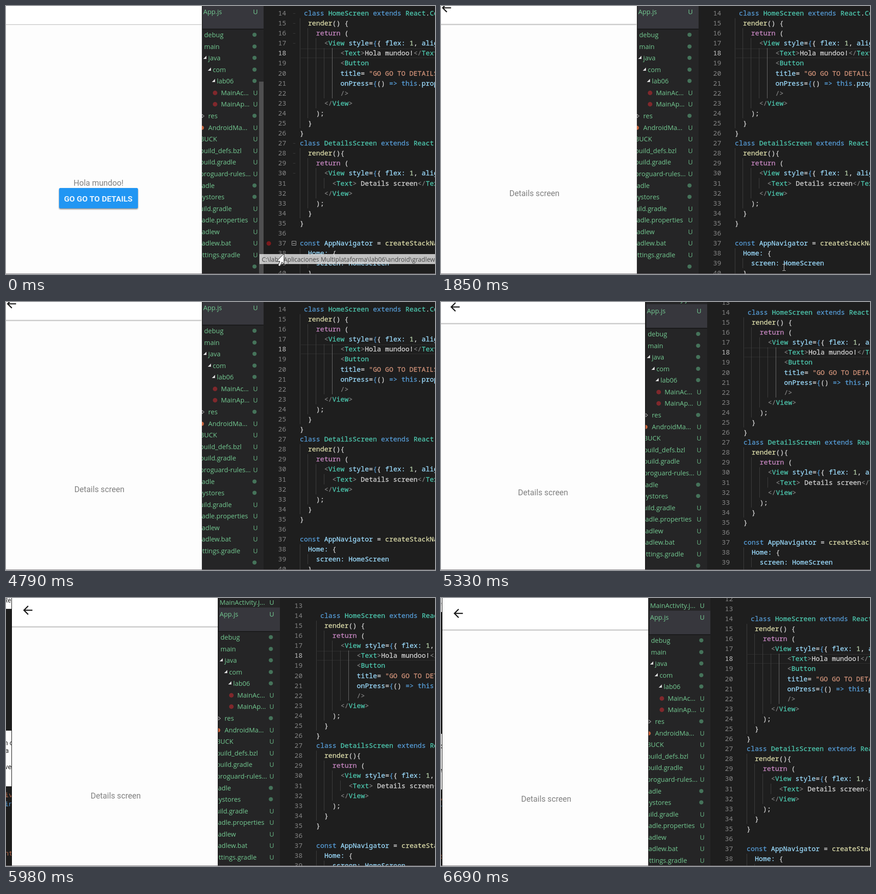
Animation of 946x592 px, one loop 8000 ms. Source, as an HTML page with a canvas:

```html
<!DOCTYPE html>
<html lang="en">
<head>
<meta charset="utf-8">
<title>App preview and editor</title>
<style>
  html, body { margin: 0; width: 100%; height: 100%; overflow: hidden; background: #1e1e1e; }
  canvas { display: block; width: 946px; height: 592px; }
</style>
</head>
<body>
<canvas id="stage" width="946" height="592"></canvas>
<script>
const ctx = document.getElementById('stage').getContext('2d', { alpha: false });
const W = 946, LOOP = 8000;
const MONO = '14.92px "Noto Sans Mono", monospace';
const UI = '14.45px "Open Sans", sans-serif';
const APP = '17.6px Roboto, sans-serif';
const CHAR = 8.952, LINE = 22.09, CODE_X = 648;

const COLORS = {
  b: '#569cd6', t: '#4ec9b0', w: '#d4d4d4', y: '#dcdcaa', p: '#c586c0',
  g: '#808080', a: '#9cdcfe', s: '#ce9178', n: '#b5cea8'
};

// line number: [column, tokens as colour|text joined by ~]
const VIEW = 'g|<~t|View~a| style~w|=~b|{~w|{ ~a|flex:~n| 1~w|, ~a|alignItems:~s| "center"';
const CODE = {
  14: [1, 'b|class ~t|HomeScreen ~b|extends ~t|React~w|.~t|Component ~w|{'],
  15: [2, 'y|render~w|() {'],
  16: [4, 'p|return ~w|('],
  17: [6, VIEW],
  18: [10, 'g|<~t|Text~g|>~w|Hola mundoo!~g|</~t|Text~g|>'],
  19: [10, 'g|<~t|Button'],
  20: [10, 'a|title~w|= ~s|"GO GO TO DETAILS"'],
  21: [10, 'a|onPress~w|=~b|{~w|() ~b|=> this~w|.~a|props~w|.~a|navigation'],
  22: [10, 'g|/>'],
  23: [6, 'g|</~t|View~g|>'],
  24: [4, 'w|);'],
  25: [2, 'w|}'],
  26: [0, 'w|}'],
  27: [0, 'b|class ~t|DetailsScreen ~b|extends ~t|React~w|.~t|Component ~w|{'],
  28: [2, 'y|render~w|(){'],
  29: [4, 'p|return ~w|('],
  30: [6, VIEW],
  31: [8, 'g|<~t|Text~g|>~w| Details screen~g|</~t|Text~g|>'],
  32: [6, 'g|</~t|View~g|>'],
  33: [4, 'w|);'],
  34: [2, 'w|}'],
  35: [0, 'w|}'],
  37: [0, 'b|const ~a|AppNavigator ~w|= ~y|createStackNavigator~w|({'],
  38: [2, 'a|Home: ~w|{'],
  39: [4, 'a|screen: HomeScreen'],
  40: [2, 'w|}']
};

// [column, first line, last line]
const GUIDES = [
  [0, 15, 25], [2, 16, 24], [4, 17, 23], [6, 18, 22], [8, 18, 22],
  [0, 28, 34], [2, 29, 33], [4, 30, 32], [6, 31, 31], [0, 38, 40], [2, 39, 39]
];

// [x, label, status, icon]
const FILES = [
  [437, 'debug', 'dot'], [437, 'main', 'dot'],
  [446, 'java', 'dot', 'open'], [456, 'com', 'dot', 'open'], [465, 'lab06', 'dot', 'open'],
  [474, 'MainAc...', 'U', 'java'], [474, 'MainAp...', 'U', 'java'],
  [446, 'res', 'dot', 'closed'], [446, 'AndroidMa...', 'U', 'xml'],
  [427.5, 'BUCK', 'U'], [427.5, 'build_defs.bzl', 'U'], [427.5, 'build.gradle', 'U'],
  [427.5, 'proguard-rules...', 'U'],
  [418, 'gradle', 'dot'], [418, 'keystores', 'dot'], [418, 'build.gradle', 'U'],
  [418, 'gradle.properties', 'U'], [418, 'gradlew', 'U'], [418, 'gradlew.bat', 'U'],
  [418, 'settings.gradle', 'U'], [418, '', 'dot']
];

// [time, x, y]
const PAN = [
  [0, 0, 0], [5330, 19, 7], [5450, 26, 12], [5590, 33, 17], [5720, 37, 21], [5860, 36, 23],
  [5985, 33, 26], [6110, 30, 28], [6270, 28, 29], [6390, 27, 29], [6530, 27, 30], [6690, 26, 30]
];
const BEAM = [
  [150, 690, 580], [300, 744, 583], [430, 754, 577], [570, 756, 577], [3940, 740, 457],
  [4090, 733, 345], [4220, 726, 232], [4360, 721, 140], [4490, 717, 54], [4640, 690, -2], [4790, 690, -40]
];
const FADE = [[0, 1], [150, .6], [300, .25], [430, 0]];
const SCREEN = [[0, 0], [1700, .5], [1850, 1]];

const BACK = new Path2D('M20 11H7.83l5.59-5.59L12 4l-8 8 8 8 1.41-1.41L7.83 13H20v-2z');

const at = (keys, t) => keys.reduce((hit, k) => t >= k[0] ? k : hit, null);
const lineY = n => 16 + LINE * (n - 14);

function rect(x, y, w, h, color) {
  ctx.fillStyle = color;
  ctx.fillRect(x, y, w, h);
}

function text(str, x, y, font, color, align = 'left', weight = 0) {
  ctx.font = font;
  ctx.fillStyle = color;
  ctx.textAlign = align;
  ctx.fillText(str, x, y);
  if (!weight) return;
  ctx.strokeStyle = color;
  ctx.lineWidth = weight;
  ctx.strokeText(str, x, y);
}

function disc(x, y, r, color) {
  ctx.fillStyle = color;
  ctx.beginPath();
  ctx.arc(x, y, r, 0, Math.PI * 2);
  ctx.fill();
}

function poly(points, fill, stroke) {
  ctx.beginPath();
  points.forEach(([x, y]) => ctx.lineTo(x, y));
  ctx.closePath();
  if (fill) { ctx.fillStyle = fill; ctx.fill(); }
  if (stroke) { ctx.strokeStyle = stroke; ctx.lineWidth = 1; ctx.stroke(); }
}

function clipped(x, y, w, h, draw) {
  ctx.save();
  ctx.beginPath();
  ctx.rect(x, y, w, h);
  ctx.clip();
  draw();
  ctx.restore();
}

function withAlpha(alpha, draw) {
  if (alpha <= 0) return;
  ctx.save();
  ctx.globalAlpha *= alpha;
  draw();
  ctx.restore();
}

function drawBehind() {
  rect(-80, -60, 57, 700, '#1e1e1e');
  rect(-80, -60, 56, 61, '#fdfdfd');
  rect(-80, 270, 56, 123, '#fdfdfd');
  const font = '15px Roboto, sans-serif';
  text('Re', -41, -13, '14px Roboto, sans-serif', '#222');
  text('n c', -40, 302, font, '#222');
  text('a', -38, 319, font, '#222');
  text('ve', -39, 355, font, '#222');
  text('iv', -39, 417, MONO, '#b5684a');
  text('in', -39, 437, MONO, '#569cd6');
  text('nt', -39, 546, MONO, '#b5684a');
  rect(-24, -60, 1, 700, '#000');
}

function drawHome() {
  rect(-23, 40, 454, 2, '#d6d6d6');
  text('Hola mundoo!', 204, 397, APP, '#808080', 'center');
  ctx.save();
  ctx.shadowColor = 'rgba(0,0,0,.45)';
  ctx.shadowBlur = 3;
  ctx.shadowOffsetY = 2;
  ctx.fillStyle = '#2196f3';
  ctx.beginPath();
  ctx.roundRect(117, 402, 174, 45, 3);
  ctx.fill();
  ctx.restore();
  text('GO GO TO DETAILS', 203.5, 431.5, 'bold 17.4px Roboto, sans-serif', '#e8f4fe', 'center');
}

function drawDetails(dy) {
  rect(-23, 39, 454, 1, '#e4e4e4');
  rect(-23, 40, 454, 1, '#c4c4c4');
  rect(-23, 41, 454, 1, '#d2d2d2');
  rect(-23, 42, 454, 1, '#f0f0f0');
  text('Details screen', 206, 419.5 + dy, APP, '#808080', 'center');
  ctx.save();
  ctx.translate(12, 4 + dy);
  ctx.scale(1.28, 1.28);
  ctx.translate(-12, -12);
  ctx.fillStyle = '#1c1c1c';
  ctx.fill(BACK);
  ctx.restore();
}

function drawPhone(mix, moved) {
  rect(-23, -60, 454, 700, '#fdfdfd');
  rect(-23, -60, 454, 100, '#fff');
  withAlpha(1 - mix, drawHome);
  withAlpha(mix, () => drawDetails(mix < 1 ? 6 : 0));
  rect(431, -60, 1, 700, moved ? '#0a0a0a' : '#e8e8e8');
}

function drawIcon(kind, x, y) {
  if (kind === 'open') poly([[x - 4, y + 2], [x - 4, y - 5], [x - 11, y + 2]], '#e0e0e0');
  if (kind === 'closed') poly([[x - 14, y - 4], [x - 9, y], [x - 14, y + 4]], null, '#d0d0d0');
  if (kind === 'java') disc(x - 13, y, 5, '#80282c');
  if (kind === 'xml') disc(x - 14, y, 4.5, '#c8643c');
}

function drawSidebar(fade) {
  const green = '#73c991';
  rect(432, -60, 136, 700, '#252526');
  rect(434, -2, 134, 52, '#37373d');
  rect(432, 50, 136, 2, '#19191a');
  clipped(432, -60, 136, 700, () => {
    text('MainActivity.j...', 435, -8, UI, green);
    text('App.js', 435, 18, UI, green);
    text('U', 550, -8, UI, green, 'center');
    text('U', 550, 17.5, UI, green, 'center');
    FILES.forEach(([x, label, status, icon], i) => {
      const y = 64 + i * 25.58;
      text(label, x, Math.round(y + 5), UI, green);
      drawIcon(icon, x, Math.round(y));
      if (status === 'U') text('U', 550, Math.round(y + 5), UI, '#66b081', 'center');
      else disc(548, Math.round(y) - .5, 4.6, '#45735a');
    });
    withAlpha(fade, () => rect(558, 167, 10, 440, '#4f4f50'));
  });
}

function drawCode(line) {
  const [start, source] = CODE[line];
  let col = start;
  source.split('~').forEach(token => {
    const str = token.slice(2);
    text(str, CODE_X + col * CHAR, Math.round(lineY(line) + 5), MONO, COLORS[token[0]], 'left', .3);
    col += str.length;
  });
}

function drawEditor(fade) {
  rect(568, -60, 420, 700, '#1e1e1e');
  rect(650, 94, 340, 1, '#303030');
  rect(650, 114, 340, 1, '#303030');
  GUIDES.forEach(([col, first, last]) => {
    const top = Math.round(lineY(first) - LINE / 2);
    const bottom = Math.round(lineY(last) + LINE / 2);
    rect(Math.floor(CODE_X + col * CHAR), top, 1, bottom - top, col === 8 ? '#707070' : '#404040');
  });
  for (let n = 12; n <= 40; n++) {
    text(n, 618, Math.round(lineY(n) + 5), MONO, n === 18 ? '#c6c6c6' : '#858585', 'right');
    if (CODE[n]) drawCode(n);
  }
  withAlpha(fade, drawFolds);
}

function drawFolds() {
  [14, 15, 16, 17, 27, 28, 29, 30].forEach(n => rect(633, Math.round(lineY(n)), 5, 1, '#3a3a3a'));
  ctx.strokeStyle = '#a8a8a8';
  ctx.lineWidth = 1;
  ctx.strokeRect(630.5, 519.5, 9, 9);
  rect(632, 524, 6, 1, '#c0c0c0');
}

function drawTooltip() {
  withAlpha(.86, () => rect(559, 548, 400, 22, '#dcdcdc'));
  text('C:\\labs\\Aplicaciones Multiplataforma\\lab06\\android\\gradlew.bat', 564, 564.5,
    '13.6px "Open Sans", sans-serif', '#484848');
}

function drawArrow() {
  poly([[613, 547], [613, 570], [608.5, 565.5], [604, 575], [600, 573], [604, 564], [597, 563.5]], '#fff', '#111');
}

function drawBeam(x, y) {
  const c = '#d8d8d8';
  rect(x, y - 6, 1, 13, c);
  [y - 7, y + 7].forEach(ey => {
    rect(x - 3, ey, 3, 1, c);
    rect(x + 1, ey, 3, 1, c);
  });
}

function draw(t) {
  const [, dx, dy] = at(PAN, t);
  const fade = at(FADE, t)[1];
  const beam = at(BEAM, t);
  ctx.textBaseline = 'alphabetic';
  ctx.lineJoin = 'round';
  ctx.save();
  ctx.translate(dx, dy);
  drawBehind();
  drawPhone(at(SCREEN, t)[1], dx > 0);
  drawSidebar(fade);
  drawEditor(fade);
  withAlpha(fade, drawTooltip);
  ctx.restore();
  if (t < 150) {
    disc(579.5, 524.5, 5, '#7c1a1c');
    drawArrow();
  }
  if (beam) drawBeam(beam[1], beam[2]);
  rect(0, 591, W, 1, '#777278');
}

const began = performance.now();
function tick() {
  draw((performance.now() - began) % LOOP);
  requestAnimationFrame(tick);
}
tick();
</script>
</body>
</html>
```
